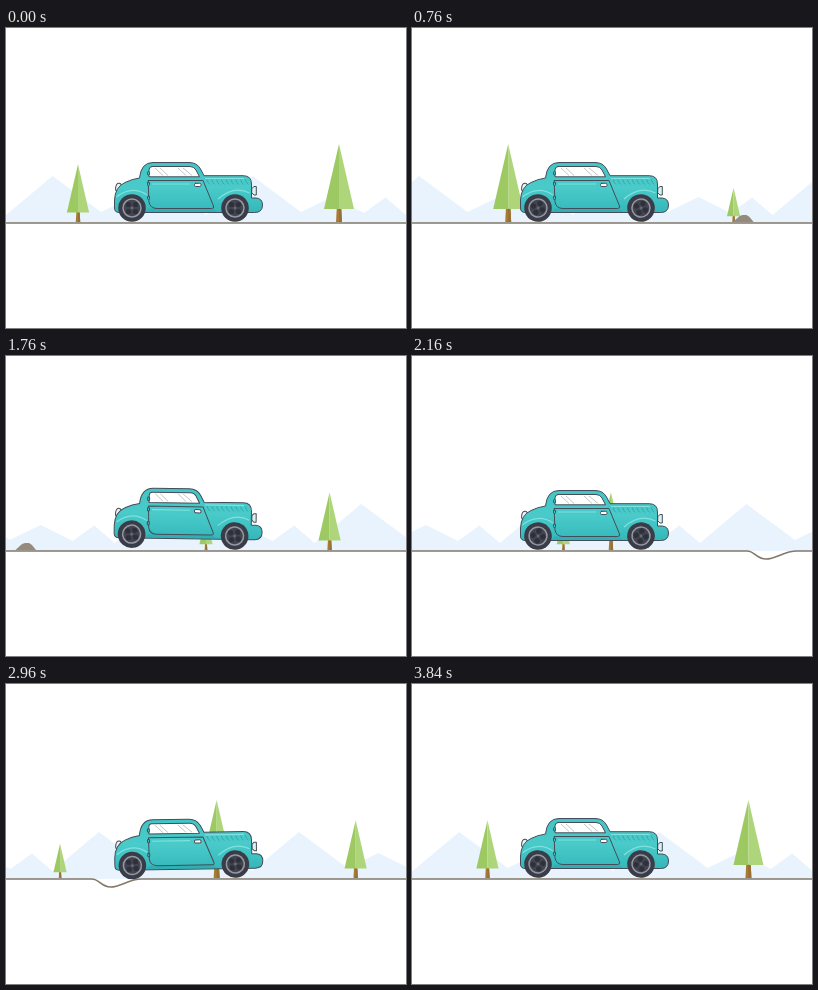
An HTML page that plays this animation: 400 by 300 pixels, repeating every 3880 ms.

```html
<!DOCTYPE html>
<html lang="en">
<head>
<meta charset="utf-8">
<title>Car on a bumpy road</title>
<style>
  html, body { margin: 0; width: 100%; height: 100%; overflow: hidden; background: #fff; }
  svg { display: block; width: 400px; height: 300px; }
  .ink { stroke: #434c58; stroke-width: 1; stroke-linejoin: round; stroke-linecap: round; }
  .line { fill: none; }
</style>
</head>
<body>
<svg viewBox="0 0 400 300">
  <defs>
    <linearGradient id="paint" x1="0" y1="0" x2="0" y2="1">
      <stop offset="0" stop-color="#42c5c5"/>
      <stop offset=".5" stop-color="#4acbca"/>
      <stop offset="1" stop-color="#35b7ba"/>
    </linearGradient>
    <g id="tree">
      <path d="M-2.2 -14H2.2L3 0H-3Z" fill="#a87b35"/>
      <path d="M0 -14H2.2L3 0H0Z" fill="#967034"/>
      <path d="M0 -78V-13H-15Z" fill="#9dc963"/>
      <path d="M0 -78V-13H15Z" fill="#afd57b"/>
    </g>
    <g id="wheel">
      <circle r="13.8" fill="#3a3c47"/>
      <circle r="9" fill="#42444f" stroke="#9599a3" stroke-width="1.5"/>
      <g fill="#2e303a">
        <circle cx="3.5" cy="3.5" r="2.6"/><circle cx="-3.5" cy="3.5" r="2.6"/>
        <circle cx="3.5" cy="-3.5" r="2.6"/><circle cx="-3.5" cy="-3.5" r="2.6"/>
      </g>
      <circle r="1.4" fill="#666a76"/>
    </g>
  </defs>

  <path id="hills" fill="#e8f3fe"/>
  <g id="trees"></g>
  <path id="rock" d="M-10.500 194L-4 188L-1 187H3L6 189L10 194Z" fill="#958b7d"/>
  <path id="road" fill="#fff" stroke="#837869" stroke-width="1.6"/>

  <g id="body">
    <ellipse cx="112.500" cy="159.500" rx="2.800" ry="4.300" fill="#eef1f3" class="ink" transform="rotate(12 112.500 159.500)"/>
    <path d="M246 160.500L248 158.500H250.300V167H248L246 165Z" fill="#d9f1f2" class="ink"/>
    <path class="ink" fill="url(#paint)" d="M113 184.500Q108.500 184.500 108.500 180V172Q109 159 119 154.500Q126 151 133.500 150
      Q135 134.500 147 134.500H183Q191 134.500 194.500 141L198 147.700H237Q245.500 147.700 245.500 156V170H250
      Q256.500 170.500 256.500 177Q256.500 184.500 249 184.500Z"/>
    <path d="M143 180.500H207L211 184H139Z" fill="#2ba6ab" opacity=".5"/>
    <g class="line" stroke="#7fe2df" stroke-width="1.2">
      <path d="M110.500 169Q126 157 141 167"/>
      <path d="M212 171Q228 157 243.500 165"/>
      <path d="M146 156H184M199 150.500H238"/>
    </g>
    <path id="louvers" class="line" stroke="#2b9ca2" stroke-width=".7"/>
    <path class="ink line" d="M142.500 152.500H197L207.500 178Q208.500 180.500 205.500 180.500H151Q144 180.500 143 174Z"/>
    <path class="ink" fill="#fff" d="M146 138.500H184Q188 138.500 190 142L193.500 148.800H143V142Q143 138.500 146 138.500Z"/>
    <path class="line" stroke="#b9bdc2" stroke-width=".9" d="M149 140L157 147.500M154 140L162 147.500M172 140L180 147.500M177 140L186 147.500"/>
    <rect class="ink" x="188.500" y="155.300" width="6.500" height="3.200" rx="1.200" fill="#fff"/>
    <g class="ink" fill="#3ec4c4">
      <rect x="141.500" y="143.500" width="2" height="3.500" rx="1"/>
      <rect x="141.500" y="154" width="2" height="3.500" rx="1"/>
      <rect x="141.500" y="168" width="2" height="3.500" rx="1"/>
    </g>
  </g>
  <use id="rear" href="#wheel"/>
  <use id="front" href="#wheel"/>
</svg>

<script>
const LOOP = 3880, STEP = 40;
const SPEED = 0.3116;                // road, px per ms
const REAR = 126, FRONT = 229, AXLE = 180;
const ROCK = 568.4, PIT = 1027;      // places along the road
const $ = id => document.getElementById(id);
const place = (el, x, y, extra = '') => el.setAttribute('transform', `translate(${x} ${y}) ${extra}`);

// Thrown up fast, settling slower
function kick(t, start, length, height) {
  const u = (t - start) / length;
  return u > 0 && u < 1 ? height * Math.sin(Math.PI * u ** 0.7) : 0;
}

// Depth of a wheel that is d px away from the bottom of the pit
const dip = d => Math.abs(d) < 30 ? 4 * (1 + Math.cos(Math.PI * d / 30)) : 0;

const hitsRock = x => (ROCK - x) / SPEED - 50;

// Hills repeat every 200 px
const ridge = [[0, 187], [46.5, 148], [95, 184], [126, 169], [158, 185], [179.5, 169.5]];
let hills = 'M0 195';
for (let n = 0; n < 4; n++) for (const [x, y] of ridge) hills += `L${x + n * 200} ${y}`;
$('hills').setAttribute('d', hills + 'L800 195Z');

let louvers = '';
for (let x = 201; x < 240; x += 4.8) louvers += `M${x} 151.500q.5 3 3 5`;
$('louvers').setAttribute('d', louvers);

function addTree(x, size) {
  const el = document.createElementNS('http://www.w3.org/2000/svg', 'use');
  el.setAttribute('href', '#tree');
  $('trees').append(el);
  return { el, x, scale: `scale(${size})` };
}
const small = addTree(414, 0.44);

// Roadside trees repeat every 1200 px
const trees = [];
for (const lap of [0, 1200]) for (const x of [lap, lap + 800]) {
  trees.push(addTree(x + 72, 0.74), addTree(x + 333, 1));
}

function draw(t) {
  const road = t * SPEED;
  place($('hills'), -t * 0.0519, 0);
  for (const k of trees) place(k.el, k.x - road, 194, k.scale);
  const sink = Math.min(1, Math.max(0, (t - 3100) / 150)) * 5.5;
  place(small.el, small.x - t * 0.1216, 194 + sink, small.scale);
  place($('rock'), ROCK - road, 0);

  const pit = PIT - road;
  $('road').setAttribute('d', `M-2000 195H${pit - 19}c8 0 9 8 19 8s18 -8 31 -8H3000`);

  const dipR = dip(pit - REAR), dipF = dip(pit - FRONT);
  const wheelR = kick(t, hitsRock(REAR), 420, 12) - dipR;
  const wheelF = kick(t, hitsRock(FRONT), 180, 7) - dipF;

  // Each throw also lifts the other end of the body a little
  const throwR = kick(t, hitsRock(REAR), 420, 17);
  const throwF = kick(t, hitsRock(FRONT), 290, 8.5);
  const bodyR = throwR + 0.4 * throwF - dipR;
  const bodyF = throwF + 0.4 * throwR - dipF;

  const tilt = Math.atan2(bodyR - bodyF, FRONT - REAR);
  place($('body'), 0, -(bodyR + bodyF) / 2, `rotate(${tilt * 180 / Math.PI} 177.500 155)`);
  const shift = -25 * Math.sin(tilt);
  const spin = `rotate(${road / 14 * 180 / Math.PI})`;
  place($('rear'), REAR + shift, AXLE - wheelR, spin);
  place($('front'), FRONT + shift, AXLE - wheelF, spin);
}

const start = performance.now();
function tick() {
  const t = (performance.now() - start) % LOOP;
  draw(Math.floor(t / STEP) * STEP);
  requestAnimationFrame(tick);
}
tick();
</script>
</body>
</html>
```
